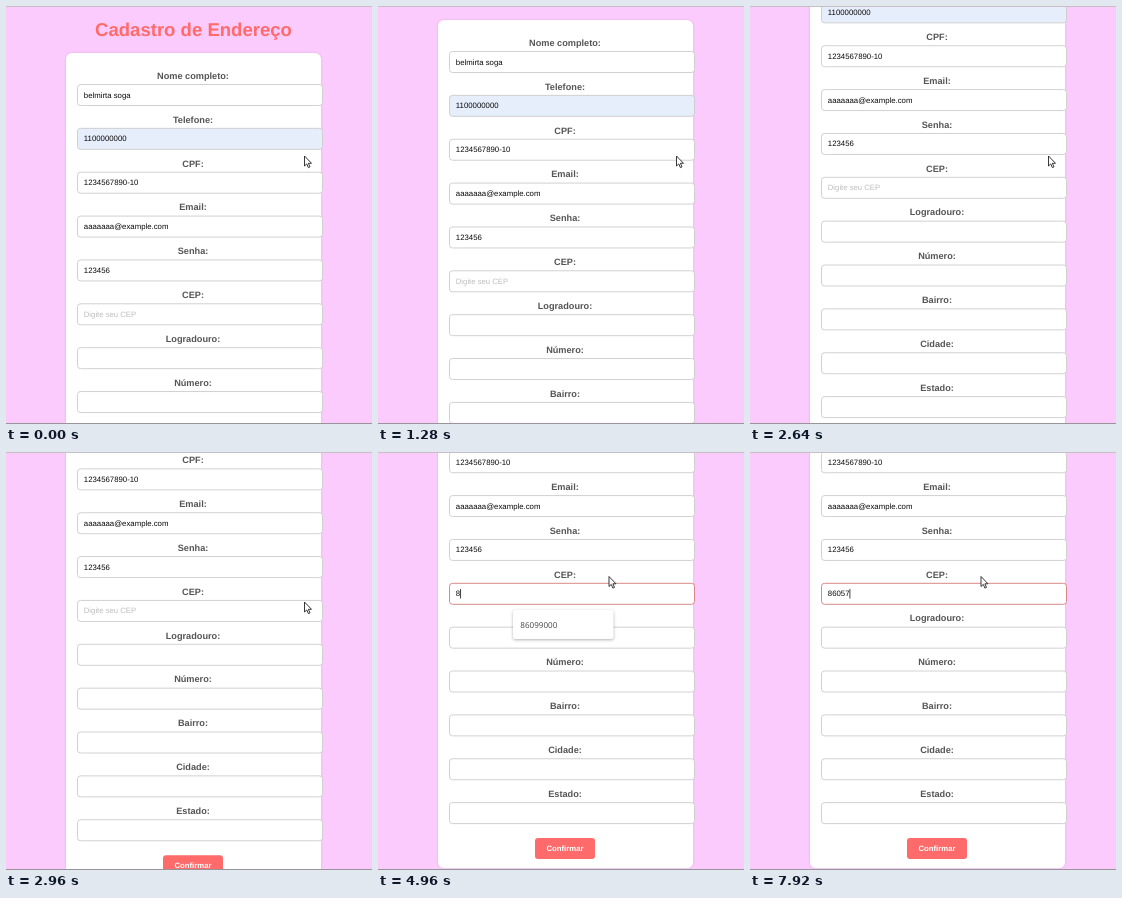
An HTML page for the animation above (8000 ms loop, 366 by 418 pixels).

```html
<!DOCTYPE html>
<html lang="pt-BR">
<head>
<meta charset="utf-8">
<title>Cadastro de Endereço</title>
<style>
  html, body { margin: 0; width: 100%; height: 100%; overflow: hidden; background: #fccbfd; }
  svg { display: block; width: 366px; height: 418px; font-family: "Liberation Sans", Arial, sans-serif; }
  text { text-rendering: geometricPrecision; white-space: pre; }
  .title { font: bold 18.56px "Liberation Sans", Arial, sans-serif; fill: #ff6b6b; text-anchor: middle; }
  .label { font-size: 9.18px; font-weight: bold; fill: #555; text-anchor: middle; }
  .value { font-size: 7.8px; fill: #0a0a0a; }
  .hint { font-size: 7.73px; fill: #bdbdbd; }
  .button { font-size: 7.73px; font-weight: bold; fill: #fff; text-anchor: middle; }
  .option { font: 8.1px "Open Sans", "Noto Sans", sans-serif; fill: #444; }
  .card { filter: drop-shadow(0 0 1.2px rgba(0, 0, 0, .14)); }
  .popup { filter: drop-shadow(0 1px 1.5px rgba(0, 0, 0, .3)); }
</style>
</head>
<body>
<svg viewBox="0 0 366 418">
  <rect width="366" height="418" fill="#fccbfd"/>
  <g id="page">
    <text class="title" x="187.5" y="30.3">Cadastro de Endereço</text>
    <rect class="card" x="60" y="47" width="255" height="535.8" rx="5.8" fill="#fff"/>
    <g id="rows"></g>
    <rect x="157" y="552.5" width="60" height="21" rx="3" fill="#ff6b6b"/>
    <text class="button" x="187" y="565.8">Confirmar</text>
  </g>
  <path id="caret" stroke="#111" stroke-width=".8"/>
  <g id="popup">
    <rect class="popup" x="135" y="158" width="100.5" height="29" rx="2.5" fill="#fff"/>
    <text class="option" x="142.3" y="176.2">86099000</text>
  </g>
  <path id="arrow" d="M0 0V10L2.3 7.9 3.9 11.6 5.5 10.9 3.9 7.3H7Z" fill="#fff" stroke="#222" stroke-width=".9"/>
  <path id="beam" d="M-2 -5H-.6L0 -4.5 .6 -5H2M0 -4.5V4.5M-2 5H-.6L0 4.5 .6 5H2" fill="none" stroke="#333" stroke-width=".9"/>
  <rect width="366" height="1" fill="#c6c0c6"/>
  <rect y="417" width="366" height="1" fill="#999499"/>
</svg>
<script>
const LOOP = 8000, STEP = 80, PITCH = 43.86, CEP = 5;
const fields = [
  ['Nome completo:', 'belmirta soga'], ['Telefone:', '1100000000'],
  ['CPF:', '1234567890-10'], ['Email:', 'aaaaaaa@example.com'],
  ['Senha:', '123456'], ['CEP:', ''], ['Logradouro:', ''],
  ['Número:', ''], ['Bairro:', ''], ['Cidade:', ''], ['Estado:', '']
];

// [time, value...]
const scroll = [[720, 0], [880, 5], [1280, 33], [1840, 100.5], [2080, 113],
  [2640, 126.5], [3200, 166.5]];
const mouse = [[3200, 298.5, 150], [3440, 274.3, 145], [3680, 274.3, 145], [4160, 231, 124.5]];
const typed = [[3680, ''], [3920, '8'], [5600, '86'], [6480, '860'], [7200, '8605'], [7520, '86057']];
const popupSpan = [4000, 7200];

const $ = id => document.getElementById(id);
const show = (id, on) => $(id).setAttribute('visibility', on ? 'visible' : 'hidden');
const move = (id, x, y) => $(id).setAttribute('transform', `translate(${x} ${y})`);

$('rows').innerHTML = fields.map(([label, value], i) => `
  <g transform="translate(0 ${i * PITCH})">
    <text class="label" x="187" y="72.8">${label}</text>
    <rect class="box" x="71.5" y="78.5" width="245" height="21" rx="3"
      fill="${i === 1 ? '#e6eefb' : '#fff'}" stroke="#ccc" stroke-width=".9"/>
    <text class="value" x="77.8" y="91.5">${value}</text>
  </g>`).join('');
const box = document.querySelectorAll('.box')[CEP];
const entry = document.querySelectorAll('.value')[CEP];

function at(table, t, col = 1) {
  const n = table.findIndex(k => k[0] > t);
  if (n === 0) return table[0][col];
  if (n < 0) return table[table.length - 1][col];
  const a = table[n - 1], b = table[n];
  return a[col] + (b[col] - a[col]) * (t - a[0]) / (b[0] - a[0]);
}

function draw(t) {
  move('page', 0, -at(scroll, t));

  const x = at(mouse, t, 1), y = at(mouse, t, 2);
  const overField = t > mouse[0][0] && y > 131;
  move('arrow', x, y);
  move('beam', x, y);
  show('arrow', !overField);
  show('beam', overField);

  const key = typed.filter(k => k[0] <= t).pop();
  const text = key ? key[1] : '';
  entry.textContent = text || 'Digite seu CEP';
  entry.setAttribute('class', text ? 'value' : 'hint');
  box.setAttribute('stroke', key ? '#d67c7c' : '#ccc');

  const caretX = 78.2 + text.length * 4.34;
  $('caret').setAttribute('d', `M${caretX} 137V146.5`);
  show('caret', key && (t - key[0]) % 1000 < 500);
  show('popup', t >= popupSpan[0] && t < popupSpan[1]);
}

const start = performance.now();
function tick() {
  const t = (performance.now() - start) % LOOP;
  draw(Math.floor(t / STEP) * STEP);
  requestAnimationFrame(tick);
}
draw(0);
requestAnimationFrame(tick);
</script>
</body>
</html>
```
